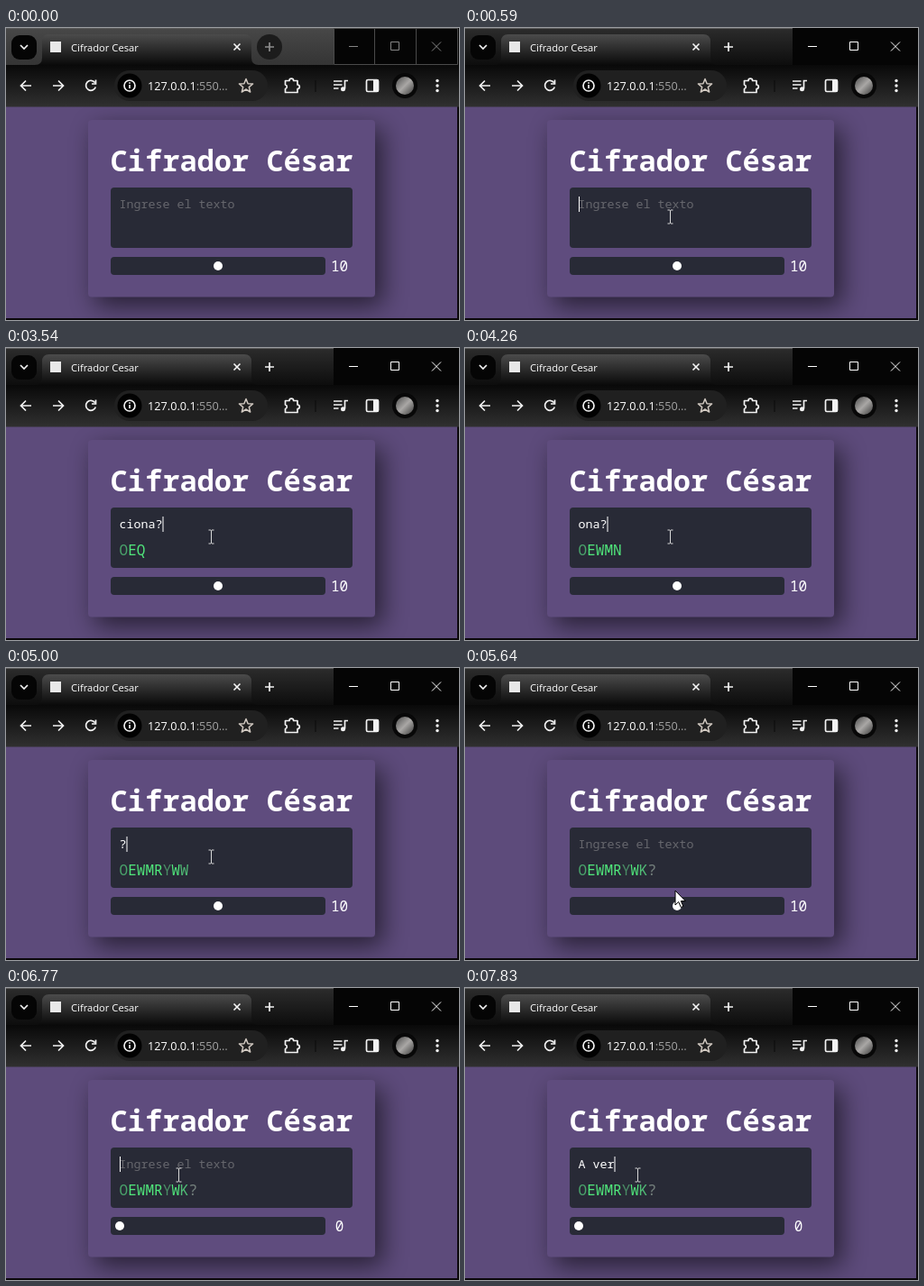
An HTML page for the animation above (7990 ms loop, 502 px wide and 324 px high).

```html
<!DOCTYPE html>
<html lang="es">
<head>
<meta charset="utf-8">
<title>Cifrador Cesar</title>
<style>
  html, body { margin: 0; width: 100%; height: 100%; overflow: hidden; background: #0b080b; }
  svg { display: block; width: 502px; height: 324px; }
  text { white-space: pre; }
  .mono { font-family: "Source Code Pro", "Noto Sans Mono", "DejaVu Sans Mono", monospace; fill: #fff; }
  .ui { font-family: "Open Sans", "Noto Sans", sans-serif; fill: #fff; }
  .line { fill: none; stroke: #f2f2f2; stroke-width: 1.7; }
  .win { fill: none; stroke-width: 1; }
</style>
</head>
<body>
<svg viewBox="0 0 502 324">
  <defs>
    <linearGradient id="idle" x2="0" y2="1"><stop stop-color="#484848"/><stop offset="1" stop-color="#343434"/></linearGradient>
    <linearGradient id="active" x2="0" y2="1"><stop stop-color="#2c2c2c"/><stop offset="1" stop-color="#0d0d0d"/></linearGradient>
    <linearGradient id="tab" x2="0" y2="1"><stop stop-color="#4b4b4b"/><stop offset="1" stop-color="#0a0a0a"/></linearGradient>
    <linearGradient id="bar" x2="0" y2="1"><stop stop-color="#090909"/><stop offset="1" stop-color="#303030"/></linearGradient>
    <linearGradient id="photo" x2="1" y2="1"><stop stop-color="#4c4c4c"/><stop offset=".5" stop-color="#a9a7a5"/><stop offset="1" stop-color="#3a3a3a"/></linearGradient>
    <filter id="blur" x="-30%" y="-40%" width="160%" height="180%"><feGaussianBlur stdDeviation="14"/></filter>
    <clipPath id="view"><rect y="87" width="500" height="235"/></clipPath>
  </defs>

  <!-- page -->
  <g clip-path="url(#view)">
    <rect y="87" width="500" height="235" fill="#5d4b7b"/>
    <rect x="99" y="112" width="318" height="196" fill="#000" opacity=".58" filter="url(#blur)"/>
    <rect x="91" y="102" width="318" height="196.5" rx="4" fill="#5f4c7e"/>
  </g>
  <text class="mono" x="115.6" y="159" font-size="32" font-weight="700">Cifrador César</text>
  <rect x="116" y="177" width="268" height="67" rx="4" fill="#282a36"/>
  <rect x="116" y="254" width="238" height="20" rx="4" fill="#282a36"/>
  <circle id="thumb" cx="235" cy="264" r="5" fill="#fff"/>
  <text id="value" class="mono" x="369.5" y="270" font-size="16" text-anchor="middle">10</text>
  <text id="hint" class="mono" x="125.6" y="200" font-size="13.333" style="fill:#66676d">Ingrese el texto</text>
  <text id="typed" class="mono" x="125.6" y="200" font-size="13.333"></text>
  <text id="result" class="mono" x="125.6" y="230" font-size="16" font-weight="500"></text>
  <rect id="caret" y="187" width="1" height="17" fill="#fff"/>

  <!-- browser frame -->
  <rect id="strip" width="502" height="41" fill="url(#idle)"/>
  <rect width="502" height="1" fill="#5a5a5a"/>
  <rect x="6" y="8" width="28" height="27" rx="9" fill="#050505"/>
  <path class="line" d="M16 19l4 4 4-4"/>
  <path d="M32 41q8 0 8-8V15q0-8 8-8H264q8 0 8 8V33q0 8 8 8Z" fill="url(#tab)"/>
  <rect x="49" y="15" width="12" height="12" fill="#e8e8e8"/>
  <text class="ui" x="72" y="26" font-size="11.2">Cifrador Cesar</text>
  <path class="line" d="M252.500 17.500l7 7m0-7l-7 7" stroke-width="1.4"/>
  <circle id="plusBg" cx="292" cy="21" r="14" fill="#1c1c1c"/>
  <path id="plus" class="line" d="M287 21h10M292 16v10"/>
  <g id="controls">
    <rect x="363" width="139" height="41" fill="#050505"/>
    <path id="edges" class="win" d="M363.500 0V40.500H500.500V0M408.500 0V40M454.500 0V40M363 .5H501" stroke="#4a4a4a"/>
    <path id="signs" class="win" d="M380 20.500h10M426.500 15.500h9v9h-9zM472 15.500l10 10m0-10l-10 10"/>
  </g>
  <rect y="41" width="502" height="46.500" fill="url(#bar)"/>
  <path class="line" d="M28 64H17m5-5.500L16.500 64l5.500 5.500M52 64h11m-5-5.500l5.500 5.500-5.500 5.500"/>
  <path class="line" d="M98.500 60.500A5.500 5.500 0 1 0 99.300 65.500M99.500 57.500V62H95"/>
  <rect x="120" y="47" width="170" height="34" rx="17" fill="#202020"/>
  <circle cx="137" cy="64" r="13.500" fill="#020202"/>
  <circle class="line" cx="137" cy="64" r="6" stroke-width="1.5"/>
  <path class="line" d="M137 63v4M137 60.300v1.500"/>
  <text class="ui" x="157" y="68.500" font-size="12.7">127.0.0.1<tspan fill="#a2a2a2">:550…</tspan></text>
  <path id="star" class="line" stroke-linejoin="round" style="stroke:#d0c8c0;stroke-width:1.5"/>
  <path class="line" stroke-linejoin="round" d="M309.500 58.500h4.500a2.300 2.300 0 0 1 4.600 0h4.400v4.500a2.300 2.300 0 0 1 0 4.600v3.900h-13.500v-4a2.300 2.300 0 0 0 0-4.500z"/>
  <rect x="342.500" y="58" width="1" height="13" fill="#0b0b0b"/>
  <path class="line" d="M363 59h9.500M363 63h9.500M363 67h5.500M375.500 67.500V58.500h3.500"/>
  <circle cx="373.500" cy="67.700" r="2.500" fill="#f2f2f2"/>
  <rect class="line" x="399.500" y="57.500" width="13" height="13" rx="1.500"/>
  <rect x="407" y="57.500" width="5.500" height="13" fill="#f2f2f2"/>
  <circle cx="442" cy="64" r="14" fill="#080808"/>
  <circle cx="442" cy="64" r="10" fill="url(#photo)"/>
  <g fill="#f2f2f2"><circle cx="478" cy="58.500" r="1.700"/><circle cx="478" cy="64" r="1.700"/><circle cx="478" cy="69.500" r="1.700"/></g>

  <!-- pointer -->
  <g id="pointer">
    <circle id="press" cx="-1" cy="-1" r="12" fill="#a59c36"/>
    <path id="arrow" d="M0 0V16l3.700-3.500 2.600 6 2.600-1.100-2.600-5.800H11.300Z" fill="#fff" stroke="#000"/>
    <path id="hand" d="M-2 1.800Q-2 0 0 0T2 1.800V8Q5 7 5.500 9 8 8.300 8.300 10.200 10.700 9.800 10.700 12.500V16Q10.700 19 8.500 22H-1Q-2 19-6 14.500-7 12-4.800 12L-2 14.300Z" fill="#fff" stroke="#000"/>
    <path id="beam" d="M-3-7.500h2.500L0-7l.5-.5H3M0-7V7M-3 7.500h2.500L0 7l.5.500H3" fill="none" stroke="#d8d8d8"/>
  </g>
</svg>
<script>
const LOOP = 7990;
const el = id => document.getElementById(id);
const show = (id, on) => { el(id).style.display = on ? '' : 'none'; };

// Last row whose time has been reached.
const at = (rows, t) => rows.filter(r => r[0] <= t).pop();

const typing = [
  [0, ''], [1320, 'F'], [1570, 'Fun'], [1730, 'Func'], [1810, 'Funci'], [1980, 'Funcio'],
  [2060, 'Funcion'], [2390, 'Funciona'], [2550, 'Funciona?'],
  [7340, 'A'], [7500, 'A '], [7670, 'A ve'], [7830, 'A ver']
];
const caretOn = [[0, 0], [590, 1], [1160, 0], [1320, 1], [5480, 0], [6770, 1], [7260, 0], [7340, 1]];
const moves = [
  [0, ''], [130, 'arrow', 379, 298], [200, 'arrow', 341, 281], [280, 'hand', 296, 259],
  [350, 'beam', 254, 230], [430, 'beam', 230.5, 211.5], [590, 'beam', 227.5, 209.5],
  [5480, 'beam', 228.5, 215.5], [5560, 'beam', 230.5, 228.5], [5640, 'arrow', 233, 247],
  [5720, 'hand', 235, 262], [5800, 'hand', 235, 266, 1],
  [6050, 'hand', 190, 265, 1], [6130, 'hand', 113, 264, 1], [6210, 'hand', 82, 263, 1],
  [6370, 'arrow', 96, 255], [6450, 'beam', 139.5, 231.5], [6530, 'beam', 178.5, 212.5],
  [6610, 'beam', 191.5, 207.5]
];
const slider = [[0, 10], [6050, 6], [6130, 0]];

const ABC = 'ABCDEFGHIJKLMNÑOPQRSTUVWXYZ';
const MESSAGE = 'Funciona?';
const START = 3052, PERIOD = 244, TICK = 81;
const noise = ['KZB', 'XHU', 'QLT', 'ZAG', 'CVN', 'PJD', 'HSO', 'MBW', 'XEF'];
const tint = { 0: '#4aa56c', 5: '#4b8d66', 7: '#50bd76', 8: '#77837f' };

const shift = (c, n) => {
  const i = ABC.indexOf(c.toUpperCase());
  return i < 0 ? c : ABC[(i + n) % ABC.length];
};

const letters = [...MESSAGE].map((c, i) => {
  const span = document.createElementNS('http://www.w3.org/2000/svg', 'tspan');
  span.style.fill = tint[i] || '#50e67b';
  el('result').append(span);
  return span;
});

// Letters leave the input one by one and settle in the result.
function cipher(t) {
  const tick = Math.floor((t - START) / TICK);
  const now = START + 4 + tick * TICK;
  letters.forEach((span, i) => {
    const phase = Math.floor((now - START - i * PERIOD) / TICK);
    span.textContent = phase < 0 ? '' : noise[i][phase] || shift(MESSAGE[i], 10);
  });
  const gone = Math.floor((now - START) / PERIOD) + 1;
  return Math.max(0, Math.min(MESSAGE.length, gone));
}

function draw(t) {
  const focus = t >= 590;
  el('strip').setAttribute('fill', focus ? 'url(#active)' : 'url(#idle)');
  el('plus').style.stroke = focus ? '#f2f2f2' : '#8c8c8c';
  el('signs').style.stroke = focus ? '#fff' : '#858585';
  show('plusBg', !focus);
  show('edges', !focus);

  const gone = cipher(t);
  const raw = at(typing, t)[1];
  const text = raw === MESSAGE ? raw.slice(gone) : raw;
  el('typed').textContent = text;
  show('hint', !text);
  show('caret', at(caretOn, t)[1]);
  el('caret').setAttribute('x', 126 + text.length * 8 - (text ? 0.5 : 0));

  const n = at(slider, t)[1];
  el('thumb').setAttribute('cx', 126 + n * 10.9);
  el('value').textContent = n;

  const [, kind, x = 0, y = 0, down] = at(moves, t);
  ['arrow', 'hand', 'beam'].forEach(k => show(k, k === kind));
  show('press', down);
  el('pointer').setAttribute('transform', `translate(${x} ${y})`);
}

el('star').setAttribute('d', 'M' + Array.from({ length: 10 }, (_, i) => {
  const r = i % 2 ? 3.5 : 8, a = i * Math.PI / 5;
  return `${(266 + r * Math.sin(a)).toFixed(1)} ${(64.5 - r * Math.cos(a)).toFixed(1)}`;
}).join('L') + 'Z');

const begin = performance.now();
function frame() {
  draw((performance.now() - begin) % LOOP);
  requestAnimationFrame(frame);
}
draw(0);
requestAnimationFrame(frame);
</script>
</body>
</html>
```
